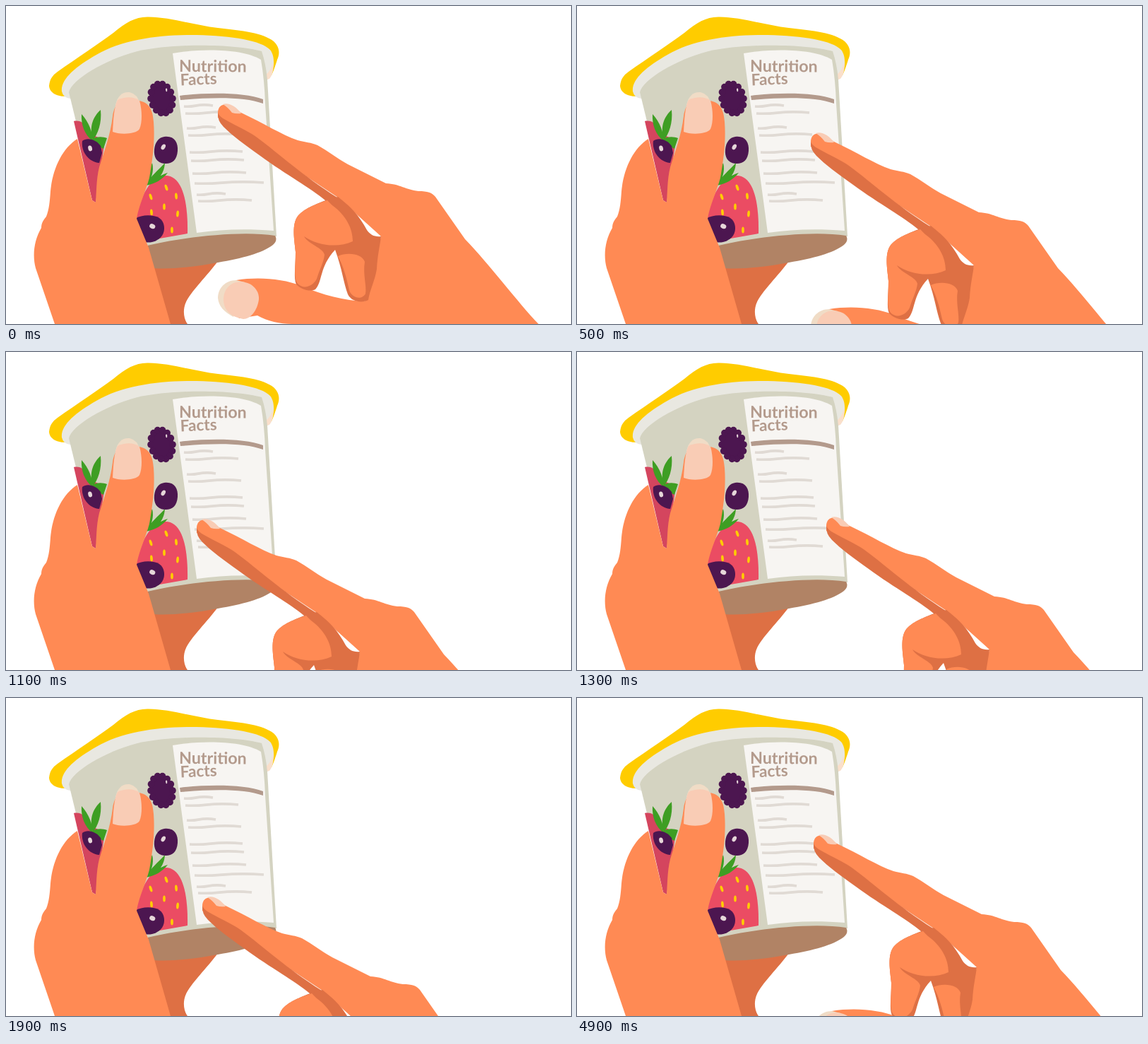
An HTML page for the animation above (5 s loop, 800 by 450 pixels).

```html
<!DOCTYPE html>
<html lang="en">
<head>
<meta charset="utf-8">
<title>Reading the label</title>
<style>
  html, body { margin: 0; width: 100%; height: 100%; overflow: hidden; background: #fff; }
  svg { display: block; width: 100%; height: 100%; }
  text { font: 700 23.3px Lato, "Open Sans", sans-serif; fill: #b39a8c; }
  .skin { fill: #ff8a54; }
  .shade { fill: #de7044; }
  .nail { fill: #f9ccb5; }
  .tip { fill: #f0dcc6; }
  .plum { fill: #4c1650; }
  .glint { fill: #e6d6d9; }
  .leaf { fill: #3e9e23; }
  .sun { fill: #ffcc00; }
  #lines { fill: none; stroke: #e0dad4; stroke-width: 3.6; }
</style>
</head>
<body>
<svg viewBox="0 0 800 450" preserveAspectRatio="none">
  <!-- palm behind the cup -->
  <path class="shade" d="M195 350L300 361C285 382 262 403 254 421C250 432 252 443 257 450H225Z"/>

  <g id="cup">
    <path class="sun" d="M61 113C62 103 66 98 73 93C100 74 130 54 152 38C170 23 182 16 200 15.500C230 15 265 27 300 31C335 35 364 38 379 50C389 59 387 70 384 76C381 86 378 94 376 98L90 128C76 129 62 125 61 113Z"/>
    <path fill="#e9e8e1" d="M79 121C77 104 98 86 128 69C165 47 220 40 270 41C320 42 362 49 374 62C382 72 379 90 376 98Q373 104 369 104L91 131Q81 130 79 121Z"/>
    <path fill="#fadfcb" d="M378 80Q379 96 373 103L369 104L368 97Q375 92 378 80Z"/>
    <path fill="#d4d3c1" d="M89 122C93 104 140 76 186 64C240 52 325 54 362 64Q368 82 370 104L383 326L205 345L127 278Z"/>
    <path fill="#f7f5f2" d="M236 67C275 60 335 60 361 76Q366 105 367 138L379 318C340 315 305 316 270 321Z"/>
    <path fill="#b39a8c" d="M246 127C285 122 338 122 364 132V138C338 128 290 129 247 133Z"/>
    <text transform="translate(245 93) rotate(.3)">Nutrition</text>
    <text transform="translate(247 112.500) rotate(-2.500)" style="font-size:22.600px">Facts</text>
    <g id="lines"></g>
    <path fill="#b18365" d="M196 340C245 328 330 317 381 325Q385 332 378 338C362 350 335 357 300 363C268 369 235 373 208 371Z"/>

    <!-- fruit -->
    <path fill="#d4455e" d="M96 163C106 161 114 167 117 180L140 190L127 278L122 275Z"/>
    <path class="leaf" d="M107 153C117 164 123 178 122 191C111 181 106 168 107 153ZM134 147C136 166 130 181 123 190C117 170 124 156 134 147ZM121 189C129 184 137 185 143 187L138 202C131 199 125 195 121 189Z"/>
    <path class="plum" d="M108 191C115 185 128 189 134 198L136 208L132 222C117 221 106 206 108 191Z"/>
    <ellipse class="glint" cx="119" cy="201.500" rx="2.800" ry="4" transform="rotate(-15 119 201)"/>
    <g id="bramble" class="plum"></g>
    <path class="glint" d="M226 117Q229 115 228 121Q226 122 226 117Z"/>
    <path class="plum" d="M224 185C238 183 244 193 243 205C242 219 234 224 224 223C213 222 209 213 210 203C211 193 216 186 224 185Z"/>
    <ellipse class="glint" cx="223" cy="199.500" rx="2.800" ry="4.200" transform="rotate(30 223 199)"/>
    <path fill="#eb4c63" d="M183 300C192 268 203 242 225 240C249 239 258 275 257 322L212 330Z"/>
    <path class="leaf" d="M207 222C210 234 206 246 198 254L196 245ZM225 222C224 239 213 250 198 254C205 240 215 233 225 222ZM229 236C222 245 211 252 198 254C207 246 217 240 229 236Z"/>
    <g id="seeds" class="sun"></g>
    <path class="plum" d="M183 301C192 295 209 295 217 300C225 305 226 318 221 325C215 333 205 336 196 334Z"/>
    <ellipse class="glint" cx="207.500" cy="311.500" rx="4.200" ry="3.300" transform="rotate(25 207 311)"/>
  </g>

  <g id="holder">
    <path class="skin" d="M69 450L42 371C37 352 40 331 50 314C50 306 54 302 57 298C61 288 62 277 63 262C66 231 79 202 101 188L122 275L127 278C128 262 128 244 132 228C139 205 148 182 151 156C154 136 164 128 188 134C202 136 208 146 209 164C211 190 208 215 203 243C197 265 188 282 185 301L202 342L233 450Z"/>
    <path class="tip" d="M155 140C158 126 166 121 175 122Q187 125 189 138Z"/>
    <path class="nail" d="M151 178C152 160 153 142 158 133C168 128 182 128 189 134C193 148 193 165 189 174C184 182 160 182 151 178Z"/>
  </g>

  <g id="pointer">
    <path class="skin" d="M300 150C301 140 309 137 318 142L333 151C365 166 390 182 413 190C424 193 432 193 441 197C456 205 469 216 484 224L538 251C558 252 566 260 584 262C597 262 603 264 608 270L650 330C684 365 726 421 754 450H405C388 450 370 446 356 438L330 442L310 402L326 388C358 383 392 386 418 396C448 409 480 417 508 418L531 326L470 271L300 158Z"/>
    <path class="shade" d="M300 151C302 157 309 160 318 165C333 173 347 179 358 188C384 207 420 240 469 271L485 283L470 287L452 275C432 258 397 239 360 212C338 196 321 184 308 171Q299 162 300 151Z"/>
    <path class="shade" d="M455 274C440 280 420 287 412 299C404 312 409 335 410 348C410 370 407 385 411 394C418 401 430 405 438 401C449 389 443 370 466 345C476 372 478 392 484 408C490 420 506 420 513 416C515 402 523 387 525 372C526 352 530 337 531 326C522 327 516 324 511 317C500 296 487 283 470 270Z"/>
    <path class="skin" d="M455 275C440 280 420 287 412 299C404 312 409 335 410 348C410 370 407 385 413 393C422 402 435 396 440 386C444 373 450 362 451 352C449 342 429 338 422 326C440 339 470 343 491 333C491 313 480 297 467 286Q460 281 455 275Z"/>
    <path class="skin" d="M470 354C483 348 504 350 508 362C505 379 511 397 509 407C504 417 489 413 486 402C482 384 478 369 470 354Z"/>
    <path class="nail" d="M307 139C315 136 326 142 333 152Q326 153 320 151Q314 143 307 139Z"/>
    <path class="tip" d="M300 413C300 399 311 388 326 388L338 391L322 440C309 433 301 425 300 413Z"/>
    <path class="nail" d="M325 391C344 387 359 400 358 415C356 431 346 443 336 443C318 440 307 430 308 413C309 401 316 394 325 391Z"/>
  </g>
</svg>
<script>
const NS = "http://www.w3.org/2000/svg";
const $ = id => document.getElementById(id);

function add(parent, tag, attrs) {
  const el = document.createElementNS(NS, tag);
  for (const k in attrs) el.setAttribute(k, attrs[k]);
  return $(parent).appendChild(el);
}

// Printed rows: x, y, width
[[252, 142, 41], [254, 152, 75], [256, 173, 41], [258, 183, 75], [260, 207, 75],
 [262, 219, 75], [264, 237, 76], [267, 251, 98], [270, 267, 41], [272, 276, 76]]
  .forEach(([x, y, w]) => add("lines", "path", {
    d: `M${x} ${y}C${x + w * .4} ${y + 2} ${x + w * .45} ${y - 5} ${x + w} ${y - 1}`
  }));

// Blackberry: a core with a ring of drupelets
add("bramble", "ellipse", { cx: 220.5, cy: 131, rx: 17, ry: 22, transform: "rotate(-10 220 131)" });
for (let i = 0; i < 14; i++) {
  const a = i / 14 * Math.PI * 2;
  add("bramble", "circle", {
    cx: 220.5 + 15.5 * Math.cos(a) + 2.5 * Math.sin(a),
    cy: 131 + 21 * Math.sin(a),
    r: 4.8
  });
}

// Strawberry seeds: x, y, tilt
[[205, 270, -20], [227, 257, -20], [241, 269, -5], [224, 284, 0],
 [243, 294, 5], [235, 317, 0], [206, 292, -5]]
  .forEach(([x, y, r]) => add("seeds", "ellipse", {
    cx: x, cy: y, rx: 1.9, ry: 4.6, transform: `rotate(${r} ${x} ${y})`
  }));

// Pointing hand: ms, dx, dy; each pose holds until the next
const LOOP = 5000;
const poses = [
  [0, 0, 0],
  [200, -19, 22], [300, -39, 44], [400, -4, 43], [500, 31, 41],
  [1000, 2, 70], [1100, -30, 98], [1200, 12, 97], [1300, 53, 95],
  [1800, 26.5, 123.5], [1900, -22, 143], [2000, 21, 141], [2100, 64, 139],
  [4900, 35, 55], [LOOP, 0, 0]
];
$("pointer").animate(
  poses.map(([t, x, y]) => ({
    offset: t / LOOP,
    transform: `translate(${x}px, ${y}px)`,
    easing: "step-end"
  })),
  { duration: LOOP, iterations: Infinity }
);
</script>
</body>
</html>
```
